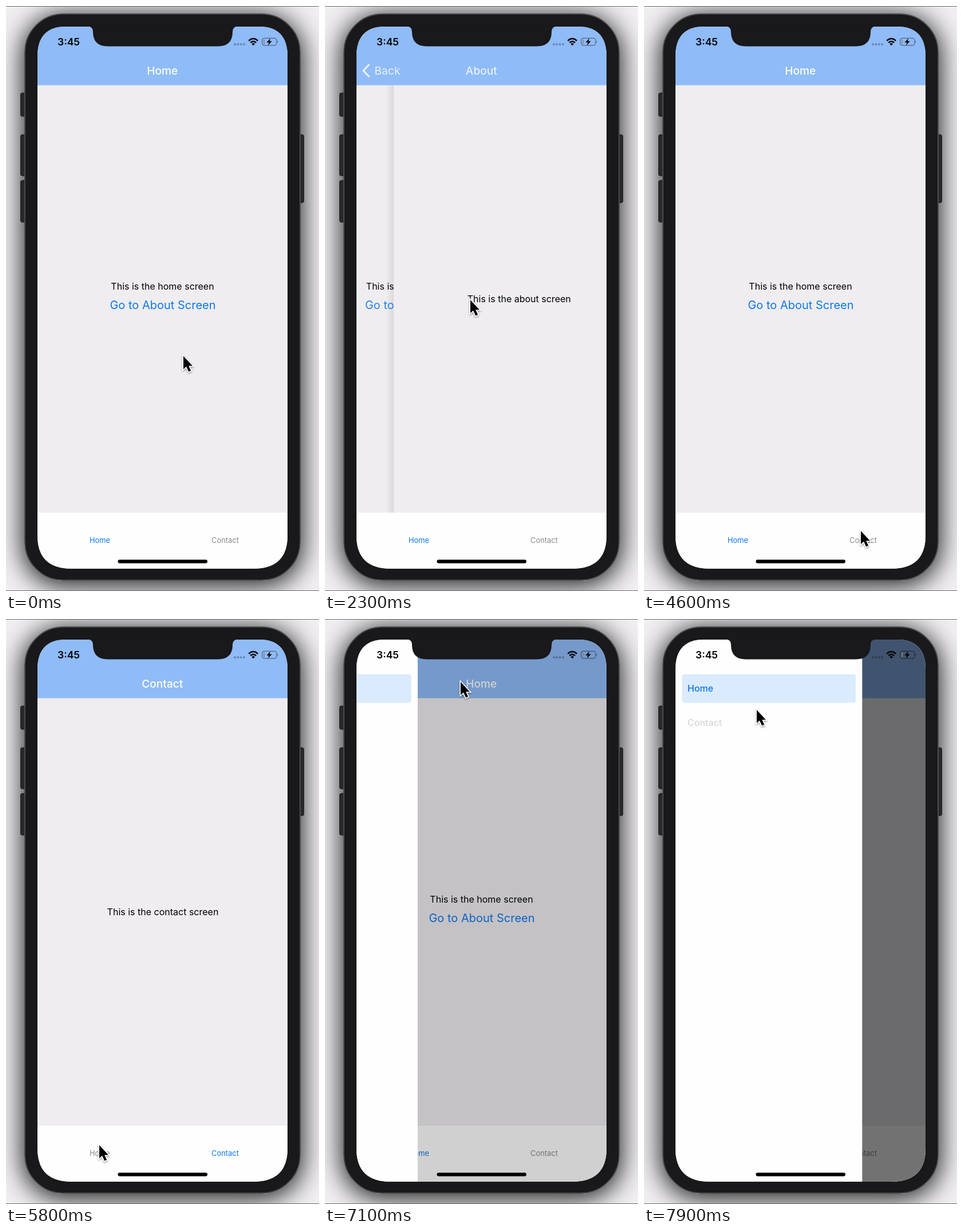
Animation of 547x1023 px, one loop 8 s. Source, as an HTML page:

```html
<!DOCTYPE html>
<html lang="en">
<head>
<meta charset="utf-8">
<title>Navigation demo</title>
<style>
  html, body { margin: 0; width: 100%; height: 100%; overflow: hidden; background: #f1eff2; }
  #stage { position: relative; width: 547px; height: 1023px; overflow: hidden; }
  #phone { position: absolute; left: 32px; top: 13px; width: 483px; height: 992px; border-radius: 68px;
           box-shadow: 0 6px 44px 4px rgba(0, 0, 0, .85); }
  svg { position: absolute; left: 0; top: 0; }
  text { font-family: Inter, "Liberation Sans", sans-serif; }
  .mid { text-anchor: middle; }
  .body { font-size: 16px; }
  .link { font-size: 20px; fill: #0b78f0; }
  .title { font-size: 19.1px; font-weight: 500; fill: #fff; }
  .tab { font-size: 12.9px; }
  .item { font-size: 16px; font-weight: 500; }
</style>
</head>
<body>
<div id="stage">
<div id="phone"></div>
<svg width="547" height="1023" viewBox="0 0 547 1023">
  <defs>
    <clipPath id="screen">
      <path d="M105 36H442Q492 36 492 88V926Q492 984 432 984H115Q55 984 55 926V88Q55 36 105 36Z"/>
    </clipPath>
    <clipPath id="content"><rect x="55" y="138.5" width="437" height="747.5"/></clipPath>
    <linearGradient id="edge">
      <stop offset="0" stop-opacity="0"/>
      <stop offset="1" stop-opacity=".1"/>
    </linearGradient>
    <filter id="soft" x="-50%" y="-50%" width="200%" height="200%">
      <feDropShadow dx="0" dy="1.5" stdDeviation="1.5" flood-opacity=".45"/>
    </filter>
  </defs>

  <path d="M0 .5H547M0 1022.5H547" stroke="#69676a"/>
  <g fill="#29282a" stroke="#1b1a1c">
    <rect x="25.5" y="152" width="12" height="41" rx="3"/>
    <rect x="25.5" y="225" width="12" height="72" rx="3"/>
    <rect x="25.5" y="305" width="12" height="73" rx="3"/>
    <rect x="509" y="225" width="11.5" height="119" rx="3"/>
  </g>
  <rect x="33" y="14" width="481" height="990" rx="67" fill="#19181a" stroke="#4b4a4c" stroke-width="2"/>

  <g clip-path="url(#screen)">
    <rect x="55" y="36" width="437" height="948" fill="#efedf0"/>
    <g clip-path="url(#content)">
      <g id="homePage">
        <text class="mid body" x="273.5" y="495.5">This is the home screen</text>
        <text class="mid link" id="link" x="274" y="530">Go to About Screen</text>
      </g>
      <g id="aboutPage">
        <rect id="pageShadow" x="41" y="138" width="14" height="748" fill="url(#edge)"/>
        <rect x="55" y="138" width="437" height="748" fill="#efedf0"/>
        <text class="mid body" x="274" y="517.5">This is the about screen</text>
      </g>
      <g id="contactPage">
        <rect x="55" y="138" width="437" height="748" fill="#efedf0"/>
        <text class="mid body" x="274" y="517.5">This is the contact screen</text>
      </g>
    </g>

    <rect x="55" y="36" width="437" height="102.5" fill="#8fbbf7"/>
    <text class="mid title" id="homeTitle" x="273.3" y="120">Home</text>
    <text class="mid title" id="aboutTitle" x="273.3" y="120">About</text>
    <text class="mid title" id="contactTitle" x="273.3" y="120">Contact</text>
    <g id="back">
      <path d="M77.5 102L67 113L77.5 124" fill="none" stroke="#fff" stroke-width="3.2"/>
      <text x="86.5" y="120" font-size="19.3" fill="#fff">Back</text>
    </g>

    <rect x="55" y="886" width="437" height="98" fill="#fefefe"/>
    <text class="mid tab" id="homeTab" x="164" y="939">Home</text>
    <text class="mid tab" id="contactTab" x="383" y="939">Contact</text>

    <rect id="dim" x="55" y="36" width="437" height="948"/>
    <g id="drawer">
      <rect x="55" y="36" width="326.3" height="948" fill="#fefefe"/>
      <rect x="66.5" y="96.5" width="303.5" height="50" rx="4" fill="#daebfd"/>
      <text class="item" x="76" y="127.3" fill="#1076e3">Home</text>
      <text class="item" id="contactItem" x="76" y="187" fill="#262528">Contact</text>
    </g>

    <rect x="195.5" y="968.2" width="156.5" height="6.2" rx="3.1"/>
    <text x="90" y="69" font-size="17.5" font-weight="600">3:45</text>
    <g fill-opacity=".27">
      <circle cx="400" cy="67" r="2"/><circle cx="405.3" cy="67" r="2"/>
      <circle cx="410.6" cy="67" r="2"/><circle cx="416" cy="67" r="2"/>
    </g>
    <g fill="none" stroke="#000" stroke-width="2.5">
      <path d="M424.3 60.8Q432.2 53.3 440.1 60.8"/>
      <path d="M427.3 64.2Q432.2 59.6 437.1 64.2"/>
    </g>
    <path d="M429.3 66.3Q432.2 63.8 435.1 66.3L432.2 69.3Z"/>
    <rect x="447.6" y="56.3" width="25.2" height="12.6" rx="3.6" fill="none" stroke="#000" stroke-opacity=".45" stroke-width="1.2"/>
    <path d="M474.2 60.5Q476.4 62.6 474.2 64.8Z" fill-opacity=".5"/>
    <rect x="449.6" y="58.3" width="2.6" height="8.6" rx="1" fill="#8d8478" fill-opacity=".7"/>
    <path d="M462 56.5L455.3 63.7H459.3L457.8 69L464.7 61.6H460.6Z"/>
  </g>
  <path d="M143 35.5Q152 36 152 45Q152 70.5 178 70.5H370Q396 70.5 396 45Q396 36 405 35.5Z" fill="#19181a"/>

  <g id="cursor" filter="url(#soft)">
    <path d="M0 0V23L5 18.5L9.2 27.5L13.2 25.7L9.2 17.2H16Z" stroke="#fff" stroke-width="3" paint-order="stroke"/>
  </g>
</svg>
</div>
<script>
const LOOP = 8, STEP = 0.1, WIDTH = 437, DRAWER = 326.3;
const PUSH = 2.115, POP = 3.415, CONTACT_ON = 4.8, CONTACT_OFF = 6;
const DRAG_END = 7.2, DRAG_ORIGIN = 130;

// Pointer stops: time, x, y
const stops = [
  [0, 310, 612], [0.1, 310, 612], [0.9, 264, 531], [1.5, 254, 514], [2.4, 254, 514],
  [3.2, 80, 111], [3.7, 80, 111], [4.45, 379, 918], [5.2, 379, 918],
  [5.8, 163, 920], [6.2, 163, 920], [6.85, 75, 118], [7, 99, 117],
  [7.2, 375, 103], [7.3, 392, 105], [7.75, 197, 159], [8, 197, 159]
];

const $ = id => document.getElementById(id);
const clamp = (v, lo = 0, hi = 1) => Math.min(hi, Math.max(lo, v));
const smooth = v => v * v * (3 - 2 * v);
const ramp = (t, from, to) => smooth(clamp((t - from) / (to - from)));
const move = (id, x, y = 0) => $(id).setAttribute("transform", `translate(${x} ${y})`);
const fade = (id, v) => $(id).setAttribute("opacity", clamp(v));

// Critically damped spring from 0 to 1
function spring(t) {
  const x = 18.26 * Math.max(0, t);
  return 1 - Math.exp(-x) * (1 + x);
}

function pointerAt(t) {
  const i = stops.findIndex((s, k) => k > 0 && t <= s[0]);
  const [t0, x0, y0] = stops[Math.max(0, i - 1)], [t1, x1, y1] = stops[Math.max(1, i)];
  const k = ramp(t, t0, t1);
  return [x0 + (x1 - x0) * k, y0 + (y1 - y0) * k];
}

function drawerAt(t, x) {
  if (t < 7) return 0;
  if (t <= DRAG_END) return clamp(x - DRAG_ORIGIN, 0, DRAWER);
  return DRAWER - (DRAWER - 375 + DRAG_ORIGIN) * Math.exp(-14 * (t - DRAG_END));
}

function render(t) {
  const [x, y] = pointerAt(t);
  move("cursor", x, y);

  const pushed = spring(t - PUSH) - spring(t - POP);
  const popping = t >= POP;
  move("homePage", -0.3 * WIDTH * pushed);
  move("aboutPage", WIDTH * (1 - pushed));
  fade("pageShadow", pushed);
  fade("link", 1 - 0.8 * (ramp(t, 1.95, 2.05) - ramp(t, 2.1, 2.36)));
  fade("back", popping ? pushed * 0.8 : pushed ** 1.4);

  const onContact = t >= CONTACT_ON && t < CONTACT_OFF;
  const rising = v => v ** 1.4, falling = v => 2 * v - 1;
  fade("aboutTitle", popping ? falling(pushed) : rising(pushed));
  fade("homeTitle", onContact ? 0 : popping ? rising(1 - pushed) : falling(1 - pushed));
  fade("contactTitle", +onContact);
  fade("contactPage", +onContact);
  $("homeTab").setAttribute("fill", onContact ? "#8a888b" : "#0b78f0");
  $("contactTab").setAttribute("fill", onContact ? "#0b78f0" : "#8a888b");

  const open = drawerAt(t, x);
  move("drawer", open - DRAWER);
  fade("dim", 0.55 * open / DRAWER);
  fade("contactItem", 1 - 0.82 * ramp(t, 7.72, 7.88));
}

const start = performance.now();
function tick() {
  const t = (performance.now() - start) / 1000 % LOOP;
  render(Math.floor(t / STEP + 1e-6) * STEP);
  requestAnimationFrame(tick);
}
tick();
</script>
</body>
</html>
```
